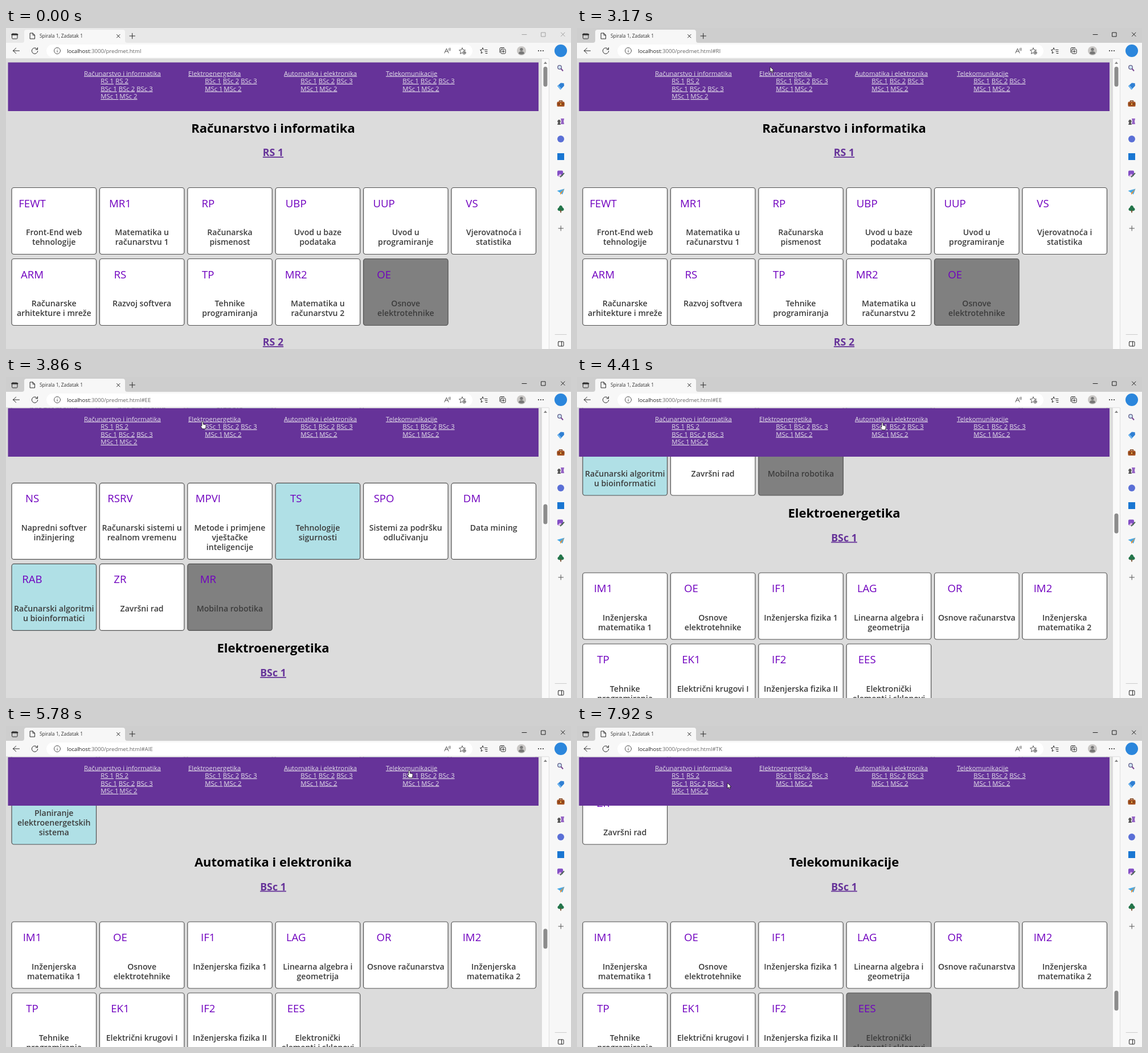
An HTML page for the animation above (7990 ms loop, 992 px wide and 564 px high).

```html
<!DOCTYPE html>
<html lang="bs">
<head>
<meta charset="utf-8">
<title>Spirala 1, Zadatak 1</title>
<style>
  html, body { margin: 0; width: 100%; height: 100%; overflow: hidden; background: #dcdcdc; }
  svg { display: block; width: 100vw; height: 100vh; font-family: "Open Sans", "Noto Sans", sans-serif; }
  .h1 { font-size: 22px; font-weight: 700; text-anchor: middle; }
  .h2 { font-size: 17.8px; font-weight: 700; text-anchor: middle; fill: #639; text-decoration: underline; text-decoration-thickness: 1.6px; }
  .code { font-size: 18.6px; text-anchor: middle; fill: #7000bf; }
  .name { font-size: 14.1px; font-weight: 600; text-anchor: middle; fill: #3c3c3c; }
  .link { font-size: 11.3px; fill: #e4e0ea; text-decoration: underline; text-decoration-thickness: 1px; }
  .card { stroke: #505050; stroke-width: 1.2; }
  .icon { fill: none; stroke: #2a2a2a; stroke-width: 1; stroke-linecap: round; stroke-linejoin: round; }
</style>
</head>
<body>
<svg viewBox="0 0 992 564" preserveAspectRatio="none">
  <clipPath id="view"><rect y="54.5" width="941" height="509.5"/></clipPath>
  <rect width="992" height="564" fill="#dcdcdc"/>
  <g clip-path="url(#view)">
    <g id="content"></g>
    <g id="nav"><rect x="3.5" y="60.5" width="931.5" height="85.5" fill="#639"/></g>
  </g>

  <rect x="941" y="54" width="12" height="510" fill="#fafafa"/>
  <path d="M944 63l3-4 3 4z" fill="#858585"/>
  <rect id="thumb" x="943.5" y="68" width="7" height="35" rx="3.5" fill="#8c8c8c"/>

  <rect id="strip" width="992" height="27"/>
  <path d="M28 26q4 0 4-4V7q0-4 4-4h169q4 0 4 4v15q0 4 4 4z" fill="#f7f7f7"/>
  <rect y="26" width="992" height="28" fill="#f7f7f7"/>
  <rect y="53.5" width="953" height=".8" fill="#d4d4d4"/>
  <rect x="953" y="54" width="39" height="510" fill="#f7f7f7"/>
  <path d="M953.5 54V564" stroke="#dedede"/>
  <rect x="71" y="29" width="748" height="22.5" rx="11.2" fill="#fff"/>

  <g class="icon">
    <rect x="10.5" y="10" width="9.5" height="9" rx="1.5"/><path d="M10.5 11.5H20" stroke-width="2.5"/>
    <path d="M42.500 9h4.500l3.500 3.500v6.500h-8zM47 9v3.500h3.500"/>
    <path d="M194.500 11.500l5.500 5.500m0-5.500l-5.500 5.500M217 14h9.500M221.700 9.300v9.500"/>
    <path d="M12.500 40h11m-11 0l5-4.700m-5 4.700l5 4.700M55 37.500a5.200 5.200 0 1 0 .7 3M55.500 34.500v3.300h-3.500"/>
    <g stroke="#555">
      <circle cx="90" cy="40" r="5.500"/><path d="M90 39.500v3M90 37v.1"/>
      <path d="M770 44l3.500-8 3.500 8m-6-3h5M777.500 36q1 1.500 0 3M779.500 35q1.500 2.500 0 5"/>
      <path d="M801 35l1.600 3.500 3.900.4-3 2.600M801 35l-1.600 3.500-3.900.4 2.900 2.600-.8 3.800 3.400-1.900"/>
      <circle cx="804.500" cy="43.500" r="2.700"/><path d="M803.200 43.500h2.600M804.500 42.200v2.600"/>
    </g>
    <path d="M840.500 38.500h4.500M841 41.500h4M842 44.500h3M837 35l1.500 3.200M837 35l-1.500 3.200-3 .4 2.300 2.300-.6 3.600 2.800-1.600"/>
    <rect x="869" y="37" width="8" height="8" rx="1.500"/>
    <path d="M867 43v-6.500q0-2 2-2h5.500M873 39v4M871 41h4"/>
    <rect x="969.500" y="551" width="9.500" height="8" rx="1"/><path d="M975.500 551v8"/>
    <path d="M970 352h8.500M974.200 347.700v8.500" stroke="#555"/>
    <path d="M964 538.500h20" stroke="#ccc"/>
  </g>
  <g fill="#222"><circle cx="935" cy="40" r="1"/><circle cx="939" cy="40" r="1"/><circle cx="943" cy="40" r="1"/></g>
  <circle cx="905" cy="40" r="8" fill="#c9c7c5"/>
  <circle cx="905" cy="37.700" r="2.700" fill="#777"/><path d="M900 45q0-4 5-4t5 4q-5 3-10 0z" fill="#777"/>
  <circle cx="974" cy="40" r="11" fill="#2b86dc"/>
  <path id="controls" class="icon" d="M906 11.500h8M940 8h7v7h-7zM974.500 8l6.500 6.500m0-6.500l-6.500 6.500"/>

  <circle cx="972" cy="69" r="3.300" fill="#cfe3f5" stroke="#66628a" stroke-width="1.300"/>
  <path d="M974.500 71.500l3.500 4" stroke="#7d4b96" stroke-width="2"/>
  <path d="M968 102l6-5.500 5.500.5.500 4.500-6.500 7z" fill="#2f7fd3"/><path d="M968 102l5.500 6.500 2-2-5.500-6.300z" fill="#6db4ee"/>
  <path d="M971.500 130v-2h5v2" fill="none" stroke="#7b3d16" stroke-width="1.300"/>
  <rect x="967.500" y="129.500" width="13" height="8.500" rx="1.500" fill="#a3501f"/><path d="M967.500 133.500h13" stroke="#64300f"/><rect x="973" y="132.500" width="2" height="2.500" fill="#f1be55"/>
  <path d="M968 170l1.500-4a2.600 2.600 0 1 1 3 0l1.500 4z" fill="#555"/><path d="M974 169l1-5-1-5h6l-1 5 1 5z" fill="#9563c4"/>
  <circle cx="974" cy="195" r="6" fill="#5a6fd6"/>
  <rect x="968" y="220" width="12" height="12" fill="#1976d2"/>
  <rect x="968" y="250.500" width="10" height="10" rx="2" fill="#8350c5"/><path d="M969 260l4-4 4 4z" fill="#e6b7ec"/><path d="M973 262l7-7" stroke="#4b6a52" stroke-width="2"/>
  <path d="M967.500 286l13-3.500-3.500 10-4-3z" fill="#48a9e6"/><path d="M980.500 282.500l-7.500 7v3.500l2-2z" fill="#e3923c"/>
  <path d="M974 311.500q3 1 3.300 4 3 1.500 2 4.500-2 2-5.300 1.500-3.300.5-5.300-1.500-1-3 2-4.500.300-3 3.300-4z" fill="#23754a"/><path d="M973.200 320h1.700v4.500h-1.700z" fill="#714426"/>

  <text x="59" y="17" font-size="8.4" fill="#333">Spirala 1, Zadatak 1</text>
  <text x="107" y="43.500" font-size="9.65" fill="#666"><tspan fill="#222">localhost</tspan>:3000/predmet.html<tspan id="hash"></tspan></text>

  <g id="cursor" fill="#fff" stroke="#111" stroke-width=".8" stroke-linejoin="round">
    <path id="arrow" d="M0 0v9.500l2.200-2 1.500 3.300 1.600-.7-1.500-3.200h3z"/>
    <path id="hand" d="M-1.200 6V.5a1.200 1.200 0 0 1 2.400 0V4l3.800.8q1.400.400 1.200 2l-.8 5.200H-.3l-3-4.500q.3-1.500 2.100-.3z"/>
  </g>
</svg>
<script>
const LOOP = 7990;
const $ = id => document.getElementById(id);
const text = (cls, x, y, s) => `<text class="${cls}" x="${x}" y="${y}">${s}</text>`;

// Card syntax "CODE:line|line"; * marks elective, ! marks locked.
const FIRST_YEAR = ["IM1:Inženjerska|matematika 1;OE:Osnove|elektrotehnike;IF1:Inženjerska fizika 1;LAG:Linearna algebra i|geometrija;OR:Osnove računarstva;IM2:Inženjerska|matematika 2",
  "TP:Tehnike|programiranja;EK1:Električni krugovi I;IF2:Inženjerska fizika II;EES:Elektronički|elementi i sklopovi"];
const POOL = {
  1: ["OS:Operativni sistemi", "BP:Baze podataka", "DS:Digitalni sistemi", "EM:Električna mjerenja", "ZR:Završni rad"],
  2: ["ASP:Algoritmi i|strukture podataka", "*TS:Teorija|signala", "LS:Logički|sklopovi", "RM:Računarske|mreže", "EP:Električne|pretvorbe", "*VI:Vještačka|inteligencija", "AU:Automatsko|upravljanje"],
  3: ["RPR:Razvoj|programskih|rješenja", "*DPS:Dizajn i|projektovanje|sistema", "OIS:Osnove|informacijskih|sistema", "OOA:Objektno|orijentisana|analiza"]
};
let seed = 7;
const random = () => (seed = seed * 16807 % 2147483647) / 2147483647;

// Each digit is the number of text lines in the tallest card of a row.
const fill = spec => [...spec].map((lines, row) => {
  const names = Array.from({ length: row ? 2 + random() * 4 | 0 : 6 }, (_, i) => {
    const options = POOL[i ? 1 + random() * lines | 0 : lines];
    return options[random() * options.length | 0];
  });
  return names.join(";");
});

const SECTIONS = [
  ["Računarstvo i informatika", [
    ["RS 1", ["FEWT:Front-End web|tehnologije;MR1:Matematika u|računarstvu 1;RP:Računarska|pismenost;UBP:Uvod u baze|podataka;UUP:Uvod u|programiranje;VS:Vjerovatnoća i|statistika",
      "ARM:Računarske|arhitekture i mreže;RS:Razvoj softvera;TP:Tehnike|programiranja;MR2:Matematika u|računarstvu 2;!OE:Osnove|elektrotehnike"]],
    ...["RS 2", "BSc 1", "BSc 2", "BSc 3", "MSc 1"].map(name => [name, fill("33")]),
    ["MSc 2", ["NS:Napredni softver|inžinjering;RSRV:Računarski sistemi u|realnom vremenu;MPVI:Metode i primjene|vještačke|inteligencije;*TS:Tehnologije|sigurnosti;SPO:Sistemi za podršku|odlučivanju;DM:Data mining",
      "*RAB:Računarski algoritmi|u bioinformatici;ZR:Završni rad;!MR:Mobilna robotika"]]]],
  ["Elektroenergetika", [
    ["BSc 1", FIRST_YEAR],
    ...["BSc 2", "BSc 3", "MSc 1"].map(name => [name, fill("21")]),
    ["MSc 2", [...fill("3"), "*PES:Planiranje|elektroenergetskih|sistema"]]]],
  ["Automatika i elektronika", [
    ["BSc 1", FIRST_YEAR], ["BSc 2", fill("22")], ["BSc 3", fill("21")], ["MSc 1", fill("3")],
    ["MSc 2", ["PSU:Projektovanje|sistema automatskog|upravljanja;MR:Mobilna robotika;*IU:Inteligentno|upravljanje;PSI:Principi sistemskog|inženjeringa;PSC:Projektovanje|sistema na čipu;*PMS:Praktikum|mikroračunarski|baziranih sistema", "ZR:Završni rad"]]]],
  ["Telekomunikacije", [["BSc 1", FIRST_YEAR.map(row => row.replace("EES", "!EES"))]]]
];

function card(source, x, y, height) {
  const [code, name] = source.replace(/^[*!]/, "").split(":");
  const color = { "*": "#b0e0e6", "!": "#808080" }[source[0]] || "#fff";
  return `<rect class="card" x="${x}" y="${y}" width="148.5" height="${height}" rx="4" fill="${color}"/>`
    + text("code", x + 36, y + 34, code)
    + name.split("|").map((line, i) => text("name", x + 74.2, y + 83.5 + 17 * i, line)).join("");
}

// Lays out the page and returns the scroll offset of each section.
function buildContent() {
  let y = 280.5, html = "";
  const anchors = SECTIONS.map(([title, groups], s) => {
    if (s) y += 136;
    const anchor = s ? y - 344 : 0;
    html += text("h1", 469, y - 97, title);
    groups.forEach(([name, rows], g) => {
      if (g) y += 91;
      html += text("h2", 469, y - 55.5, name);
      rows.forEach((row, r) => {
        if (r) y += 8;
        const cards = row.split(";");
        const height = 83 + 17 * Math.max(...cards.map(c => c.split("|").length));
        html += cards.map((c, i) => card(c, 10 + 154.4 * i, y, height)).join("");
        y += height;
      });
    });
    return anchor;
  });
  $("content").innerHTML = html;
  return anchors;
}

const LINKS = [[137, 273], [320, 414], [488, 619], [667, 759]];
const STEP = { R: 26, B: 31.5, M: 33 };
function buildNav() {
  const common = [["BSc 1", "BSc 2", "BSc 3"], ["MSc 1", "MSc 2"]];
  $("nav").innerHTML += LINKS.map(([x], i) => {
    const rows = i ? common : [["RS 1", "RS 2"], ...common];
    return text("link", x, 83.5, SECTIONS[i][0]) + rows.map((row, r) =>
      row.map((s, k) => text("link", x + 29.3 + k * STEP[s[0]], 97 + 13.5 * r, s)).join("")).join("");
  }).join("");
}

const anchors = buildContent();
buildNav();

const CLICK = 2280;
const HASHES = [[CLICK, "#RI"], [3430, "#EE"], [4660, "#AIE"], [6040, "#TK"]];
// Scroll start, first visible moment
const JUMPS = [[3296, 3430], [4620, 4680], [6031, 6045]];
const PATH = [[860, 678, 338], [1220, 470, 195], [1610, 297, 65], [1680, 290, 68], [2200, 214, 79],
  [2500, 214, 79], [2850, 275, 229], [3170, 339, 68], [3300, 345, 79], [4220, 345, 79], [4410, 536, 81],
  [4550, 546, 76], [5440, 546, 76], [5780, 708, 79], [6500, 708, 79], [6580, 710, 76], [6700, 710, 76],
  [6860, 628, 278], [7540, 628, 278], [7920, 264, 100], [LOOP, 264, 100]];

function easeInOut(t) {
  let low = 0, high = 1, s = .5;
  for (let i = 0; i < 20; i++) {
    s = (low + high) / 2;
    const x = 1.26 * (1 - s) ** 2 * s + 1.74 * (1 - s) * s * s + s ** 3;
    if (x < t) low = s; else high = s;
  }
  return s * s * (3 - 2 * s);
}

function scrollAt(t) {
  return JUMPS.reduce((y, [start, visible], i) => t < visible ? y
    : y + (anchors[i + 1] - y) * easeInOut(Math.min(1, (t - start) / 720)), 0);
}

function cursorAt(t) {
  const i = Math.max(1, PATH.findIndex(p => p[0] > t));
  const [t0, x0, y0] = PATH[i - 1], [t1, x1, y1] = PATH[i];
  const k = (t - t0) / (t1 - t0);
  return [x0 + (x1 - x0) * k, y0 + (y1 - y0) * k];
}

function render(t) {
  const scroll = scrollAt(t), active = t >= CLICK;
  $("content").setAttribute("transform", `translate(0 ${-scroll})`);
  $("nav").setAttribute("transform", `translate(0 ${-Math.min(scroll, 6)})`);
  $("thumb").setAttribute("y", 68 + scroll / 14.55);
  $("strip").setAttribute("fill", active ? "#cecece" : "#e8e8e8");
  $("controls").style.stroke = active ? "#222" : "#a0a0a0";
  $("hash").textContent = HASHES.reduce((s, [at, hash]) => t >= at ? hash : s, "");

  const [x, y] = cursorAt(t);
  const onLink = y > 72 && y < 86 && LINKS.some(([a, b]) => x >= a && x <= b);
  $("cursor").setAttribute("visibility", t < 860 ? "hidden" : "visible");
  $("cursor").setAttribute("transform", `translate(${x} ${y})`);
  $("hand").style.display = onLink ? "" : "none";
  $("arrow").style.display = onLink ? "none" : "";
}

const begin = performance.now();
function tick() {
  render((performance.now() - begin) % LOOP);
  requestAnimationFrame(tick);
}
tick();
</script>
</body>
</html>
```
